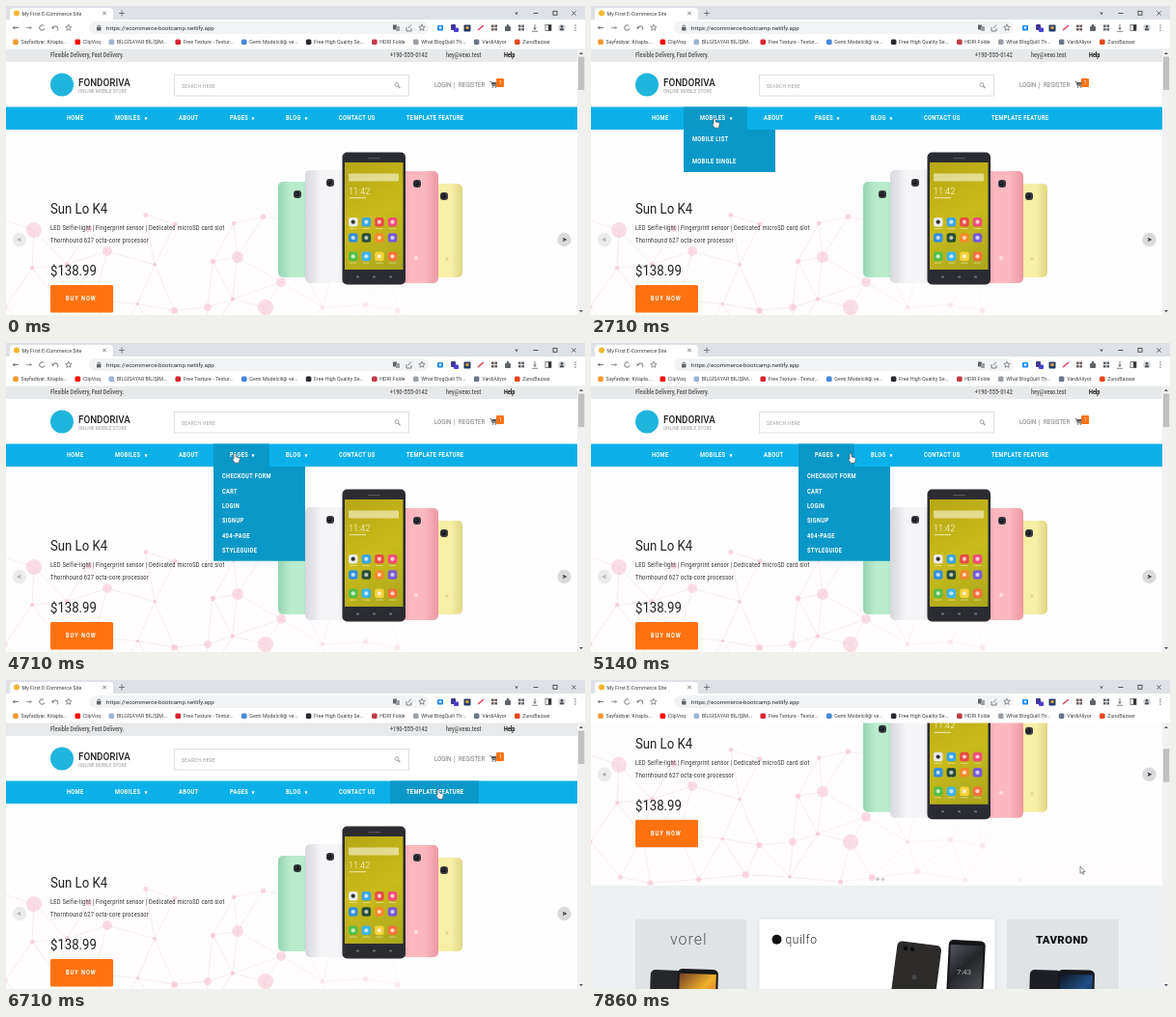
An HTML page with a canvas that plays this animation: 600x320 px, repeating every 8 s.

```html
<!DOCTYPE html>
<html lang="en">
<head>
<meta charset="utf-8">
<title>Shop walkthrough</title>
<style>
html, body { margin: 0; width: 100%; height: 100%; overflow: hidden; background: #fff; }
canvas { display: block; width: 600px; height: 320px; }
</style>
</head>
<body>
<canvas id="stage" width="600" height="320"></canvas>
<script>
const ctx = document.getElementById('stage').getContext('2d');
const LOOP = 8000, STEP = 1000 / 7;
const NARROW = 0.86; // condensed look for the whole page typeface
const BLUE = '#0cb0e8', DEEP = '#0a98c8', ORANGE = '#ff720f';

// step, x, y of the pointer's stops
const POINTER = [
  [12, 282, 219], [17, 128, 116], [21, 128, 116], [24, 74, 116], [27, 143, 115],
  [30, 205, 114], [36, 269, 114], [47, 448, 113], [50, 507, 193]
];

const PAD = 17;
const NAV = [
  { name: 'HOME', x: 63 },
  { name: 'MOBILES', x: 113, more: true, gap: 22.5, menu: ['MOBILE LIST', 'MOBILE SINGLE'] },
  { name: 'ABOUT', x: 179 },
  { name: 'PAGES', x: 232, more: true, gap: 15.3,
    menu: ['CHECKOUT FORM', 'CART', 'LOGIN', 'SIGNUP', '404-PAGE', 'STYLEGUIDE'] },
  { name: 'BLOG', x: 290, more: true },
  { name: 'CONTACT US', x: 345 },
  { name: 'TEMPLATE FEATURE', x: 415 }
];
NAV.forEach((item, i) => {
  item.left = item.x - PAD;
  item.right = i + 1 < NAV.length ? NAV[i + 1].x - PAD : 490;
});

function randomizer(seed) {
  return () => (seed = seed * 16807 % 2147483647) / 2147483647;
}

function pointerAt(n) {
  const next = POINTER.findIndex(key => n <= key[0]);
  if (next < 0) return POINTER[POINTER.length - 1].slice(1);
  const [t0, x0, y0] = POINTER[Math.max(0, next - 1)], [t1, x1, y1] = POINTER[next];
  const k = t1 > t0 ? (n - t0) / (t1 - t0) : 0;
  return [x0 + (x1 - x0) * k, y0 + (y1 - y0) * k];
}

function scrollAt(n) {
  const u = Math.max(0, Math.min(1, (n - 50) / 5.8));
  return 147 * (1 - (1 - u) ** 2);
}

function rect(x, y, w, h, fill, r = 0) {
  ctx.fillStyle = fill;
  ctx.beginPath();
  ctx.roundRect(x, y, w, h, r);
  ctx.fill();
}

function disc(x, y, r, fill) {
  ctx.fillStyle = fill;
  ctx.beginPath();
  ctx.arc(x, y, r, 0, Math.PI * 2);
  ctx.fill();
}

function line(points, color, width = 0.8) {
  ctx.strokeStyle = color;
  ctx.lineWidth = width;
  ctx.beginPath();
  for (let i = 0; i < points.length; i += 2) ctx.lineTo(points[i], points[i + 1]);
  ctx.stroke();
}

function ring(x, y, r, color, from = 0, to = Math.PI * 2) {
  ctx.strokeStyle = color;
  ctx.lineWidth = 0.9;
  ctx.beginPath();
  ctx.arc(x, y, r, from, to);
  ctx.stroke();
}

function chevron(x, y, dx, dy, color, width) {
  line([x - dx - dy, y - dy - dx, x + dx, y + dy, x - dx + dy, y - dy + dx], color, width);
}

function cross(x, y, r, color) {
  line([x - r, y - r, x + r, y + r], color);
  line([x + r, y - r, x - r, y + r], color);
}

function star(x, y, r, color) {
  const points = [];
  for (let i = 0; i <= 10; i++) {
    const a = i * Math.PI / 5, d = i % 2 ? r * 0.45 : r;
    points.push(x + Math.sin(a) * d, y - Math.cos(a) * d);
  }
  line(points, color, 0.7);
}

function shade(x0, y0, x1, y1, ...colors) {
  const g = ctx.createLinearGradient(x0, y0, x1, y1);
  colors.forEach((c, i) => g.addColorStop(i / (colors.length - 1), c));
  return g;
}

// returns the drawn width
function text(s, x, y, size, color, weight = 400, spacing = 0, squeeze = 1) {
  ctx.save();
  ctx.translate(x, y);
  ctx.scale(squeeze, 1);
  ctx.font = `${weight} ${size}px Roboto, "Open Sans", sans-serif`;
  ctx.letterSpacing = spacing + 'px';
  ctx.fillStyle = color;
  ctx.fillText(s, 0, 0);
  const width = ctx.measureText(s).width * squeeze;
  ctx.restore();
  return width;
}

function narrow(s, x, y, size, color, weight, spacing) {
  return text(s, x, y, size, color, weight, spacing, NARROW);
}

function drawToolbar() {
  const ink = '#5f6368', y = 22.5;
  const left = i => 10 + 13.7 * i, right = i => 450 + 14 * i;
  for (const [x, dir, color] of [[left(0), -1, ink], [left(1), 1, '#8a8e93']]) {
    line([x - 3, y, x + 3, y], color);
    chevron(x + dir * 1.7, y, dir * 1.3, 0, color);
  }
  ring(left(2), y, 2.7, ink, 0.3, 5.4);
  ring(left(3), y + 1, 2.7, ink, Math.PI, 7);
  chevron(left(3) - 2.5, y, 0, 1, ink);
  star(left(4), y, 3.4, ink);

  rect(86, 16, 352, 13, '#f1f3f4', 6.5);
  rect(94, 21.7, 4.4, 3.8, ink, 0.5);
  ring(96.2, 21.5, 1.4, ink, Math.PI, 0);
  text('https://ecommerce-bootcamp.netlify.app', 104, 24.8, 6.15, '#2b2d30');
  rect(401, 19.5, 4, 5, ink, 0.5);
  rect(404, 21, 4, 5, '#9aa0a6', 0.5);
  line([415, 22, 415, 26, 420, 26, 420, 23], ink);
  line([417, 23, 420, 19.5], ink);
  star(431, y, 3.4, ink);

  rect(right(0) - 3, 20, 6, 5.5, '#1a8cf0', 1);
  disc(right(0), y, 1.3, '#fff');
  rect(right(1) - 3, 19, 5, 6, '#41388f', 1);
  rect(right(1), 22.5, 5, 4.5, '#4a3fd0', 1);
  rect(right(2) - 3.5, 19.5, 7, 7, '#203a6a', 1);
  disc(right(2), y, 1.8, '#d9a03a');
  line([right(3) - 3, 25, right(3) + 3, 20], '#d8455c', 1.6);
  for (const i of [4, 6]) {
    for (let k = 0; k < 4; k++) rect(right(i) - 3 + (k % 2) * 3.4, 19.5 + (k >> 1) * 3.4, 2.6, 2.6, i < 6 ? '#6b5b58' : ink);
  }
  rect(right(5) - 3, 21, 6, 5, ink, 1);
  disc(right(5), 20.5, 1.4, ink);
  line([right(7), 19, right(7), 24], ink);
  chevron(right(7), 23.4, 0, 1.2, ink);
  line([right(7) - 3, 26.3, right(7) + 3, 26.3], ink);
  ctx.strokeRect(right(8) - 3, 19.5, 6, 6);
  rect(right(8), 19.5, 3, 6, '#333');
  disc(right(9), y, 3.8, '#d5d8dd');
  disc(right(9), 21.3, 1.4, '#4c4f55');
  rect(right(9) - 2.2, 23.2, 4.4, 2, '#4c4f55', 1);
  for (let k = -1; k < 2; k++) disc(right(10), y + k * 2.5, 0.7, ink);
}

function drawBookmarks() {
  const marks = [
    ['#f29a2e', 'Sayfadiyar. Kitapla...'], ['#f00', 'ClipVoq'], ['#9fb4cf', 'BİLGİSAYAR BİLİŞİM...'],
    ['#d9232e', 'Free Texture - Textur...'], ['#4488dd', 'Gemi Modelciliği ve...'],
    ['#26292d', 'Free High Quality Se...'], ['#c03a47', 'HDRI Folde'],
    ['#9aa0a6', 'What BlogQuill Th...'], ['#6b7688', 'VardiAliyor'], ['#e8471d', 'ZunoBazaar']
  ];
  let x = 10;
  for (const [color, name] of marks) {
    rect(x - 2.8, 34.5, 5.6, 5.6, color, 1.5);
    x += 5.5;
    x += text(name, x, 39.3, 5.3, '#3c4043') + 11.2;
  }
}

function drawBrowser() {
  rect(0, 0, 600, 15, '#dee1e6');
  rect(4, 2, 107, 14, '#fff', 4);
  rect(0, 14, 600, 30.5, '#fff');
  disc(11, 7.5, 3, '#f5b52e');
  text('My First E-Commerce Site', 16.5, 9.6, 5.4, '#3c4043');
  cross(102, 7.5, 1.8, '#5f6368');
  line([117, 7.5, 123, 7.5], '#5f6368');
  line([120, 4.5, 120, 10.5], '#5f6368');
  chevron(529, 7.5, 0, 1.2, '#333');
  line([546.5, 7.5, 551.5, 7.5], '#333');
  ctx.strokeRect(567, 5.3, 4, 4);
  cross(588.5, 7.5, 2, '#333');
  drawToolbar();
  drawBookmarks();
}

function drawHeader() {
  rect(0, 44, 592, 14.5, '#e7e9eb');
  narrow('Flexible Delivery, Fast Delivery.', 46, 53.3, 6.4, '#666', 700);
  narrow('+190-555-0142', 398, 53.3, 6.4, '#666', 700);
  narrow('hey@vexo.test', 456, 53.3, 6.4, '#666', 700);
  narrow('Help', 516, 53.3, 6.4, '#111', 700);
  rect(0, 58, 592, 46.5, '#fff');
  disc(58, 81.5, 12, '#1fb5dc');
  narrow('FONDORIVA', 75, 83, 11.4, '#222', 500);
  narrow('ONLINE MOBILE STORE', 75, 90, 5.5, '#999');
  ctx.strokeStyle = '#dcdfe1';
  ctx.lineWidth = 1;
  ctx.strokeRect(174.5, 71.5, 243, 21.5);
  narrow('SEARCH HERE', 182, 84.5, 5.7, '#999', 400, 0.35);
  ring(405, 81.5, 1.9, '#999');
  line([406.4, 83, 408.4, 85], '#999', 1.1);
  narrow('LOGIN', 444, 83.8, 7, '#777');
  narrow('|', 464, 83.8, 7, '#777');
  narrow('REGISTER', 469, 83.8, 7, '#777');
  line([501.5, 78.5, 503, 78.5, 504, 82.5, 508, 82.5], '#555');
  rect(503.5, 79, 5, 2.6, '#555');
  disc(504.5, 84, 0.8, '#555');
  disc(507.3, 84, 0.8, '#555');
  rect(508, 75, 8, 9, ORANGE, 1);
  text('1', 510.7, 81.4, 5, '#fff');
}

// a few large hubs, then a jittered lattice joined to its neighbours
const nodes = [
  [29, 232, 8], [105, 254, 5], [240, 260, 6], [285, 286, 5], [269, 312, 8], [209, 312, 4]
].map(([x, y, r]) => ({ x, y, r }));
const random = randomizer(47);
for (let row = 0; row < 4; row++) {
  for (let x = -10; x < 440; x += 46) {
    const node = { x: x + (row % 2) * 23 + random() * 18, y: 216 + row * 42 + random() * 16, r: 1.5 + random() * 2 };
    if (nodes.every(o => Math.hypot(o.x - node.x, o.y - node.y) > 26)) nodes.push(node);
  }
}
const links = nodes.flatMap((a, i) => nodes.slice(i + 1)
  .filter(b => Math.hypot(a.x - b.x, a.y - b.y) < 54).map(b => [a, b]));

function drawNetwork() {
  ctx.save();
  ctx.beginPath();
  ctx.rect(0, 128, 592, 229);
  ctx.clip();
  const wire = shade(0, 0, 450, 0, 'rgba(225,185,190,.4)', 'rgba(222,180,195,.4)', 'rgba(225,195,210,.1)');
  for (const [a, b] of links) line([a.x, a.y, b.x, b.y], wire, 0.6);
  for (const { x, y, r } of nodes) {
    disc(x, y, r, `rgba(240,150,175,${x < 320 ? 0.36 : 0.15})`);
    if (r < 4) continue;
    for (let v = -r; v <= r; v += 1.8) line([x - r, y + v, x + r, y + v], 'rgba(255,255,255,.4)', 0.6);
  }
  ctx.restore();
}

function backPhone(x, y, w, h, light, dark, camX) {
  const camY = y + 13;
  rect(x, y, w, h, shade(x, 0, x + w, 0, dark, light, light, dark), 5);
  rect(camX - 4, camY - 4, 8, 8, '#3a3a40', 3);
  disc(camX - 0.5, camY, 2.4, '#16171b');
  disc(camX - 1, camY - 0.6, 0.7, '#56607a');
}

function drawPhones() {
  backPhone(282, 182, 38, 99, '#b9ebcd', '#96d4b2', 302);
  backPhone(438, 184, 35, 97, '#f6efa6', '#dfd582', 454);
  backPhone(310, 170, 50, 117, '#f5f4f7', '#d8d7dd', 336);
  backPhone(404, 171, 44, 116, '#fbb8c0', '#ec98a4', 426);
  disc(425, 261, 2, 'rgba(255,255,255,.5)');
  disc(457, 262, 1.5, 'rgba(190,175,80,.4)');

  rect(348.5, 151.5, 65.5, 137, '#2b2c31', 5);
  rect(351, 162, 60.5, 111, shade(351, 162, 411, 273, '#b7a615', '#cabb1a', '#a9a61c'));
  rect(375, 157, 13, 1.2, '#55565c', 0.6);
  rect(355, 173.5, 52, 8, 'rgba(255,255,240,.55)', 1);
  text('11:42', 355, 194.5, 9.2, '#fffce0', 300);
  rect(356, 198, 17, 1.2, 'rgba(255,255,230,.6)');
  const apps = ['#e9e9ea', '#3aa7e8', '#e84b45', '#ef4d79', '#3490dc', '#2c4f38',
    '#f5892c', '#7a5bd6', '#55bf48', '#3cb5f2', '#f4d23c', '#f2723c'];
  apps.forEach((color, i) => {
    const row = i >> 2, x = 355 + (i % 4) * 13.6, y = 219 + row * 16.3 + (row > 1 ? 3 : 0);
    rect(x, y, 9.5, 9.5, color, 2.5);
    disc(x + 4.7, y + 4.7, 2.1, i ? 'rgba(255,255,255,.7)' : '#333');
    if (row !== 1) rect(x + 1, y + 11, 7.5, 0.9, 'rgba(255,255,235,.5)');
  });
  for (let x = 363; x < 400; x += 17) rect(x, 279.5, 3, 2, '#6a6b70');
}

function arrowButton(x, dir, fill, ink) {
  disc(x, 242, 7.2, fill);
  chevron(x, 242, dir * 1.4, 0, ink, 1.3);
}

function drawHero() {
  rect(0, 128, 592, 229, shade(0, 128, 0, 357, '#fefdfe', '#fefcfd'));
  drawNetwork();
  drawPhones();
  narrow('Sun Lo K4', 46, 215, 15.3, '#222');
  narrow('LED Selfie-light | Fingerprint sensor | Dedicated microSD card slot', 46, 232.3, 6.65, '#333', 400, 0.27);
  narrow('Thornhound 627 octa-core processor', 46, 245.2, 6.65, '#333', 400, 0.27);
  narrow('$138.99', 46, 279, 15.3, '#222');
  rect(46, 289, 65, 28.5, ORANGE, 1.5);
  narrow('BUY NOW', 62, 305.4, 6.6, '#fff', 700, 1.1);
  arrowButton(14, -1, 'rgba(220,220,222,.55)', '#aaa');
  arrowButton(578.5, 1, '#d9dadc', '#333');
  disc(297, 350.5, 1.8, '#c4c4c8');
  disc(302.5, 350.5, 1.8, '#d3d3d6');
}

function device(x, y, w, tilt, fill, screen) {
  ctx.save();
  ctx.translate(x, y);
  ctx.rotate(tilt);
  rect(0, 0, w, 80, fill, 5);
  if (screen) rect(2, 5, w - 4, 75, shade(0, 5, w, 45, ...screen));
  ctx.restore();
}

function drawCards() {
  rect(0, 357, 592, 130, '#edf1f3');
  rect(46, 392, 115, 95, '#dfe3e6');
  rect(431, 392, 116, 95, '#dfe3e6');
  ctx.save();
  ctx.shadowColor = 'rgba(0,0,0,.12)';
  ctx.shadowBlur = 5;
  rect(174.5, 392, 244, 95, '#fff');
  ctx.restore();

  text('vorel', 82, 418.5, 16, '#555', 300, 1);
  device(62, 444, 34, 0.04, '#25272b');
  device(90, 443, 42, 0.03, '#17181b', ['#6b3a2a', '#f0b02a', '#d8452a']);

  disc(192.5, 413, 5, '#111');
  text('quilfo', 201.5, 417, 12, '#222', 300, 0.6);
  device(318, 414, 46, 0.13, '#2d2b2a');
  disc(326, 422, 2.4, '#0c0c0e');
  disc(333, 423, 2.2, '#0c0c0e');
  disc(335, 452, 2.5, '#47484c');
  device(371, 413, 38, 0.05, '#141518', ['#55585e', '#232529', '#4a4c52']);
  text('7:43', 379, 449, 8, '#eee', 300);

  text('TAVROND', 461, 417.5, 11.4, '#111', 900, 0.3);
  device(455, 444, 33, 0.03, '#1c1e23');
  device(484, 444, 38, 0.02, '#17191d', ['#10141c', '#1f4f86', '#10141c']);
}

function hovered(n) {
  if (n < POINTER[0][0]) return -1;
  const [x, y] = pointerAt(n);
  if (y < 104 || y >= 128) return -1;
  return NAV.findIndex(item => x >= item.left && x < item.right);
}

function drawNav(n) {
  rect(0, 104.5, 592, 23.5, BLUE);
  NAV.forEach(({ name, x, left, right, more, menu, gap }, i) => {
    // highlight fades over three steps
    const glow = [0, 1, 2].filter(back => hovered(n - back) === i).length / 3;
    ctx.globalAlpha = glow;
    rect(left, 104.5, right - left, 23.5, DEEP);
    ctx.globalAlpha = 1;
    narrow(name, x, 118, 6.6, '#fff', 700, 0.4);
    if (more) chevron(right - PAD, 116.2, 0, 1, '#fff', 1.2);
    if (menu && glow > 0.5) {
      rect(left, 128, 95, menu.length * gap + (menu.length > 2 ? 6 : -1), DEEP);
      menu.forEach((item, j) => narrow(item, left + 9, 140.4 + j * gap, 6.6, '#fff', 700, 0.4));
    }
  });
}

function drawScrollbar(scroll) {
  rect(592, 44, 8, 276, '#f1f1f1');
  rect(593, 52.5 + scroll * 0.13, 6.3, 34.5, '#c1c1c1');
  ctx.fillStyle = '#555';
  for (const [y, d] of [[49, -1], [316, 1]]) {
    ctx.beginPath();
    ctx.moveTo(594, y - d);
    ctx.lineTo(598, y - d);
    ctx.lineTo(596, y + d * 1.2);
    ctx.fill();
  }
}

const ARROW = new Path2D('M0 0V7.4L1.7 5.9L2.8 8.3L3.9 7.8L2.8 5.5H5.1Z');
const HAND = new Path2D('M-1 1Q0-.6 1 1V4L4.6 4.8Q5.4 5 5.2 6.5L4.4 10.2H.2L-2.4 6.6Q-2.6 5.4-1 6.2Z');

function drawPointer(n) {
  if (n < POINTER[0][0]) return;
  const shape = hovered(n) >= 0 ? HAND : ARROW;
  ctx.save();
  ctx.translate(...pointerAt(n));
  ctx.fillStyle = '#fff';
  ctx.strokeStyle = '#444';
  ctx.lineWidth = 0.6;
  ctx.fill(shape);
  ctx.stroke(shape);
  ctx.restore();
}

function draw(time) {
  const n = Math.floor((time % LOOP + 5) / STEP);
  const scroll = scrollAt(n);
  ctx.clearRect(0, 0, 600, 320);
  ctx.save();
  ctx.translate(0, -scroll);
  drawHero();
  drawCards();
  drawHeader();
  drawNav(n);
  ctx.restore();
  drawBrowser();
  drawScrollbar(scroll);
  drawPointer(n);
}

let start;
function tick(now) {
  start ??= now;
  draw(now - start);
  requestAnimationFrame(tick);
}
draw(0);
requestAnimationFrame(tick);
</script>
</body>
</html>
```
